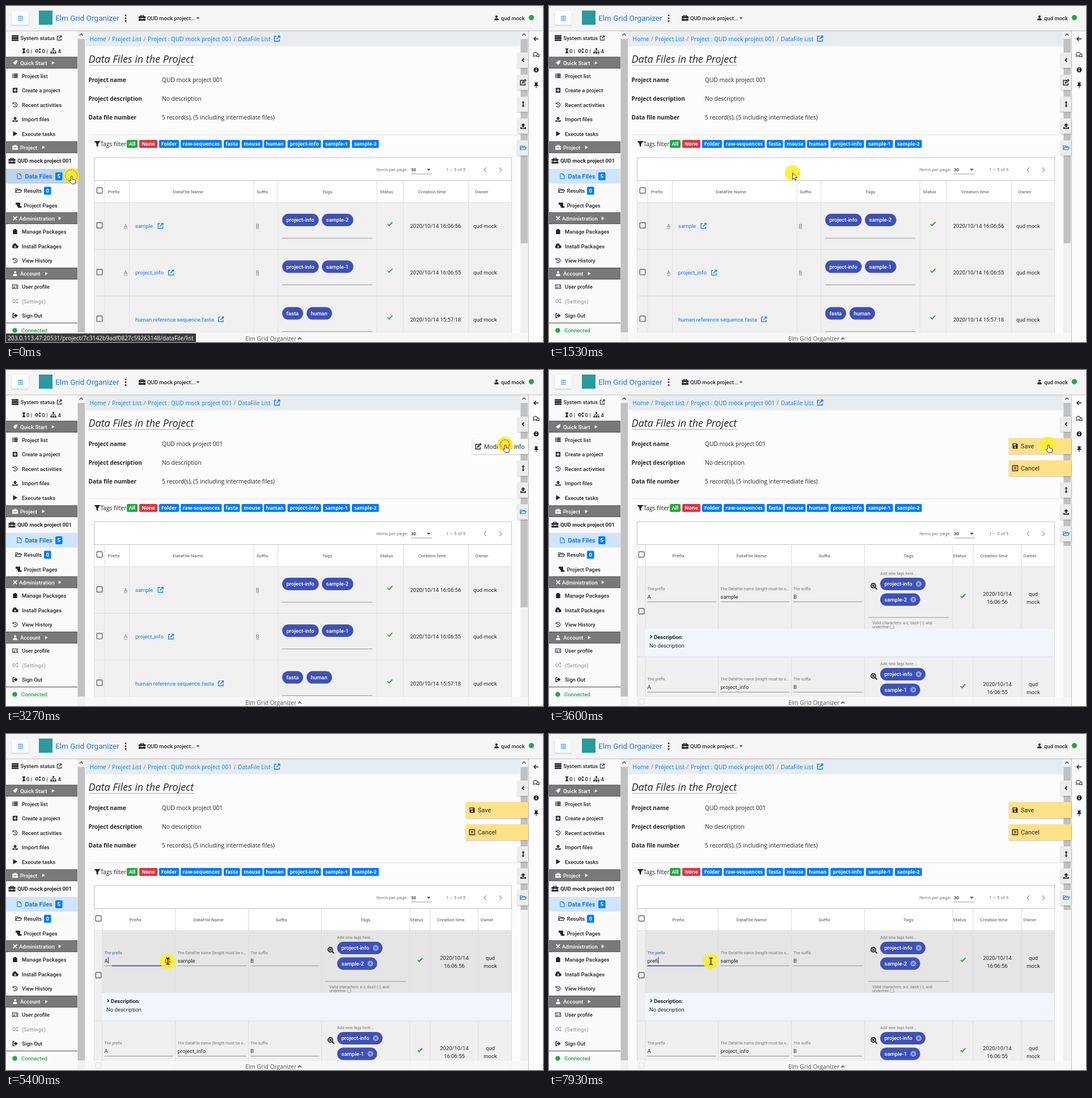
Animation, 947 px wide and 592 px high, one loop 8 s. Source, as an HTML page:

```html
<!DOCTYPE html>
<html lang="en">
<head>
<meta charset="utf-8">
<title>Data file list</title>
<style>
html,body{margin:0;width:100%;height:100%;overflow:hidden;background:#fcfcfc}
svg{display:block;width:100vw;height:100vh}
text{font:400 9.5px Roboto,sans-serif;white-space:pre}
.m{font-weight:500}
.b{font-weight:700}
.big{font-size:10.85px}
.head{font-size:8.1px;font-weight:500}
.sm{font-size:8.1px}
.tiny{font-size:7.1px}
.brand{font-size:13.6px}
.o{font:400 10.2px "Open Sans",sans-serif}
.ob{font:700 10px "Open Sans",sans-serif}
.tag{font:700 8.8px "Open Sans",sans-serif}
.title{font:italic 400 18px "Open Sans",sans-serif}
.lift{filter:drop-shadow(0 1px 1.2px rgba(0,0,0,.24))}
</style>
</head>
<body>
<svg id="stage" viewBox="0 0 947 592" preserveAspectRatio="none"></svg>
<script>
const BLUE = '#007bff', INK = '#212529', GREY = '#757575', INDIGO = '#3f51b5', GREEN = '#28a745';
const BRAND = 'Elm Grid Organizer', PROJECT = 'QUD mock project', USER = 'qud mock';
const LINK = '203.0.113.47:20531/project/7c3142b9adf0827c59263148/dataFile/list';

// name: [path, stroke width; 0 means filled]
const ICONS = {
  ext: ['M-1-4H-4.3V4.3H4V1M1-4.5H4.5V-1M4.5-4.5L-1 1', 1.3],
  server: ['M-6-5h12v2.8h-12zM-6-1.4h12v2.8h-12zM-6 2.2h12v2.8h-12z', 0],
  list: ['M-5-4h2v2h-2zM-2.2-4H5v2h-7.2zM-5-1h2v2h-2zM-2.2-1H5v2h-7.2zM-5 2h2v2h-2zM-2.2 2H5v2h-7.2z', 0],
  plus: ['M-4.5-4.5h9v9h-9zM-.8-3v2.2H-3v1.6h2.2V3h1.6V.8H3v-1.6H.8V-3z', 0],
  history: ['M-3-3A4.2 4.2 0 1 1-3.6 2.4M-4.4-4.6V-1.9H-1.7M0-2V.5L1.7 1.5', 1.2],
  upload: ['M0-5L4-1H1.3V2.5h-2.6V-1H-4zM-5 2h2.5v1.5h5V2H5v3H-5z', 0],
  play: ['M-3.8-5L4.5 0L-3.8 5z', 0],
  case: ['M-6-3h3v-2h6v2h3v3.5H1.2V0h-2.4v.5H-6zM-1.8-3h3.6v-.9h-3.6zM-6 1.5h4.8v.7h2.4V1.5H6V5H-6z', 0],
  file: ['M-3.5-4.5H1L3.5-2V4.5H-3.5zM1-4.5V-2H3.5', 1],
  folder: ['M-5 3V-3.5h3l1 1h4V-1M-5 3L-3-1H5.5L3.5 3z', 1.1],
  scroll: ['M-5-4.5H3V2H5.5V4.5H-1V2H-2.5V-1H-5z', 0],
  tools: ['M-4-4L4 4M4-4L-4 4', 2],
  box: ['M-4-3.5h2V-5h4v1.5h2V5h-8z', 0],
  cloud: ['M-5.5 1.5a2.5 2.5 0 0 1 1.7-3A3.4 3.4 0 0 1 3-2 3 3 0 0 1 3.5 4H-3.5A2.5 2.5 0 0 1-5.5 1.5M-.7-1v2h-1.6L0 3.3 2.3 1H.7v-2z', 0],
  user: ['M0-5a2.4 2.4 0 1 1-.01 0zM-4.4 5V3A3 3 0 0 1-1.4.5h2.8A3 3 0 0 1 4.4 3V5z', 0],
  card: ['M-5-3.5h10v7h-10zM-3.2 1.5h3M-1.7-1.8v1.8M1.5-1h2.2M1.5 1h2.2', 1.1],
  gears: ['M-2-2.6a2.6 2.6 0 1 1-.01 0zM4-4a1 1 0 1 1-.01 0zM4 1.5a1 1 0 1 1-.01 0z', 1.5],
  exit: ['M-1-4.5V-3H-3.5V3H-1V4.5H-5V-4.5zM.5-4L5 0L.5 4V1.4H-2.5v-2.8H.5z', 0],
  rocket: ['M5-5C0-5-2-2.5-3-1L-5 0l2 1L-1 3 0 5 1 3C2.5 2 5 0 5-5z', 0],
  filter: ['M-5.5-5H5.5L1.5 0V5.5L-1.5 3V0z', 0],
  glass: ['M-3.4-5H3.4L.8 0 3.4 5H-3.4L-.8 0z', 0],
  tree: ['M-1.5-5h3v3h-3zM-5.5 2h3v3h-3zM-1.5 2h3v3h-3zM2.5 2h3v3h-3zM-.4-2h.8V2h-.8zM-4.4-.4h8.8V2h-.8V.4h-7.2V2h-.8z', 0],
  edit: ['M1-3.5H-4.7V4.7H3.5V1M-1.7 1.7L-1-.5 3.5-5 5-3.5 .5 1z', 1.4],
  updown: ['M0-5.5L2.7-2.4H.8v4.8H2.7L0 5.5-2.7 2.4H-.8v-4.8H-2.7z', 0],
  left: ['M4.2 0H-3.5M-.5-3.5L-4 0L-.5 3.5', 1.6],
  chat: ['M-2 2.5L-5 3.2l.6-2A3.6 3.2 0 1 1-2 2.5M2.8-1.6A3 2.6 0 0 1 4.6 2.4L5 4 3 3.5A4 3 0 0 1-.5 2.8', 1.1],
  info: ['M0-4.5a4.5 4.5 0 1 1-.01 0zM-.8-.8v3.6h1.6v-3.6zM-.8-3v1.4h1.6V-3z', 0],
  pin: ['M-3-5H3v1.3H2L2.3-1 4 1.5H.6V5h-1.2V1.5H-4L-2.3-1-2-3.7H-3z', 0],
  check: ['M-4 .2L-1.4 2.8L4.3-3.2', 2],
  save: ['M-4.5-4.5H3L4.5-3V4.5H-4.5zM-3-3.3h4.5v2.5H-3zM0 .6a1.5 1.5 0 1 1-.01 0z', 0],
  cancel: ['M-4.6-4.5h9.2v9h-9.2zM-2-2L2 2M2-2L-2 2', 1.3],
  zoom: ['M-1-5a4 4 0 1 1-.01 0zM2 2L5.5 5.5M-3-1H1M-1-3V1', 1.8],
  chevL: ['M2-4L-2 0L2 4', 1.2],
  chevR: ['M-2-4L2 0L-2 4', 1.2],
  chevU: ['M-3 1.5L0-1.5L3 1.5', 1.5],
  boldL: ['M1.4-3L-1.4 0L1.4 3', 1.9],
  boldR: ['M-1.2-2.5L1.2 0L-1.2 2.5', 1.6],
  down: ['M-3.4-1.7H3.4L0 1.9z', 0]
};

const rect = (x, y, w, h, fill, extra = '') =>
  `<rect x="${x}" y="${y}" width="${w}" height="${h}" fill="${fill}" ${extra}/>`;
const line = (x1, y1, x2, y2, c = '#dcdcdc', w = 1) =>
  `<path d="M${x1} ${y1}L${x2} ${y2}" stroke="${c}" stroke-width="${w}" fill="none"/>`;
const text = (x, y, s, cls = '', fill = INK, anchor = 'start', id = '') =>
  `<text ${id && `id="${id}"`} x="${x}" y="${y}" class="${cls}" fill="${fill}" text-anchor="${anchor}">${s}</text>`;
const mid = (x, y, s, cls, fill) => text(x, y, s, cls, fill, 'middle');
const dot = (x, y, r, fill, extra = '') => `<circle cx="${x}" cy="${y}" r="${r}" fill="${fill}" ${extra}/>`;
const group = (id, body, extra = '') => `<g id="${id}" ${extra}>${body}</g>`;
function icon(name, x, y, c = INK, k = 1) {
  const [d, w] = ICONS[name];
  const paint = w ? `fill="none" stroke="${c}" stroke-width="${w}"` : `fill="${c}" fill-rule="evenodd"`;
  return `<path d="${d}" transform="translate(${x} ${y}) scale(${k})" ${paint}/>`;
}
const checkbox = (x, y) => rect(x - 4.8, y - 4.8, 9.6, 9.6, 'none', 'stroke="#666" stroke-width="1.4" rx="1"');

function header() {
  return rect(0, 0, 947, 43, '#f5f5f5', 'class="lift"') +
    rect(10, 9, 30, 24, '#fff', 'rx="2" class="lift"') +
    [18.2, 21.5, 24.8].map(y => line(21, y, 30, y, BLUE, 1.2)).join('') +
    rect(58, 8, 24, 25, '#2a9a9c') +
    text(87, 26, BRAND, 'brand', '#1f74e0') +
    [16.5, 21.5, 26.5].map(y => dot(211, y, 1.5, INK)).join('') +
    icon('case', 240, 21) + text(249, 24.5, PROJECT + '...', 'm') + icon('down', 338.5, 21.5, INK, .8) +
    icon('user', 865, 21, INK, .85) + text(873, 24.5, USER, 'm') + dot(926.5, 20.5, 4.7, GREEN);
}

function sidebar() {
  const item = (y, ic, s, c = INK) => icon(ic, 16, y, c, .92) + text(28, y + 3.5, s, 'm', c);
  const section = (y, ic, s, arrow) => rect(0, y - 10, 126, 20, '#797979') +
    line(0, y - 10, 126, y - 10, '#4a4a4a') + line(0, y + 9.7, 126, y + 9.7, '#4a4a4a') +
    icon(ic, 16, y, '#fff', .85) + text(s === 'Administration' ? 23 : 25, y + 3.5, s, 'm', '#fff') +
    icon('play', arrow, y, '#fff', .6);
  const badge = (x, y, s) => rect(x, y - 7, 12.5, 14, BLUE, 'rx="2"') + mid(x + 6.2, y + 3.4, s, 'b', '#fff');
  return rect(0, 44, 126, 548, '#fafafa') +
    icon('server', 16, 56.5) + text(25.5, 59.5, 'System status', 'm') + icon('ext', 94, 56.5, INK, .85) +
    icon('glass', 31.5, 79, INK, .85) + text(36, 82.5, '0 |', 'm') + icon('gears', 56, 79, INK, .9) + text(63.5, 82.5, '0 |', 'm') +
    icon('tree', 83.5, 79, INK, .95) + text(91.5, 82.5, '4', 'm') +
    section(100, 'rocket', 'Quick Start', 83) +
    item(123, 'list', 'Project list') + item(148.5, 'plus', 'Create a project') +
    item(174, 'history', 'Recent activities') + item(199.5, 'upload', 'Import files') + item(225, 'play', 'Execute tasks') +
    section(249, 'case', 'Project', 66) +
    icon('case', 10.5, 272.5) + text(20, 276, PROJECT + ' 001', 'b') +
    rect(0, 287, 126, 26, '#d0e5fb', 'id="active"') + icon('file', 23.5, 300, BLUE) +
    text(33.5, 304, 'Data Files', 'b big', '#1677ee') + badge(87, 300, '5') +
    icon('folder', 22, 325.5) + text(31.5, 329, 'Results', 'm') + badge(67, 325.5, '0') +
    icon('scroll', 22, 351) + text(31.5, 354.5, 'Project Pages', 'm') +
    section(374, 'tools', 'Administration', 95) +
    item(397.5, 'box', 'Manage Packages') + item(423, 'cloud', 'Install Packages') + item(448.5, 'history', 'View History') +
    section(471.5, 'user', 'Account', 71) +
    item(494.5, 'card', 'User profile') + item(520, 'gears', '(Settings)', '#a5a5a5') + item(545.5, 'exit', 'Sign Out') +
    line(0, 558.5, 126, 558.5, '#444') + dot(15.5, 571.5, 4.3, GREEN) + text(27, 575, 'Connected', 'm', GREEN) +
    rect(126, 44, 14, 548, '#f1f1f1') + rect(126.5, 58, 12.5, 517, '#c1c1c1', 'id="thumb"') +
    icon('chevU', 132.5, 50.5, '#505050');
}

function details() {
  const row = (y, k, v) => text(145.5, y, k, 'ob') + text(275, y, v, 'o');
  const tags = [['All', 213, 19, GREEN], ['None', 235, 32, '#dc3545'], ['Folder', 270, 35], ['raw-sequences', 308, 72.5],
    ['fasta', 384, 28.5], ['mouse', 415.5, 37], ['human', 455, 38], ['project-info', 496.5, 59], ['sample-1', 559, 47.5], ['sample-2', 610, 47.5]];
  return rect(140, 44, 767, 548, '#fcfcfc') + rect(140, 44, 767, 27, '#e9ecef') +
    text(147.5, 61.5, 'Home', 'o', BLUE) + text(180, 61.5, '/', 'o', '#6c757d') +
    text(187, 61.5, 'Project List', 'o', BLUE) + text(242.5, 61.5, '/', 'o', '#6c757d') +
    text(250, 61.5, `Project : ${PROJECT} 001`, 'o', BLUE) + text(401.5, 61.5, '/', 'o', '#6c757d') +
    text(409, 61.5, 'DataFile List', 'o', BLUE) + icon('ext', 478, 57.5, BLUE, 1.05) +
    text(145.5, 100, 'Data Files in the Project', 'title') + line(146, 104.5, 332, 104.5, '#aaa') +
    row(134, 'Project name', PROJECT + ' 001') + row(167, 'Project description', 'No description') +
    row(200, 'Data file number', '5 record(s), (5 including intermediate files)') +
    line(146, 227, 902, 227, '#e4e4e4') +
    icon('filter', 161, 243) + text(166.5, 247, 'Tags filter', 'o') +
    tags.map(([s, x, w, c = BLUE]) => rect(x, 236, w, 14, c, 'rx="2"') + mid(x + w / 2, 246.4, s, 'tag', '#fff')).join('') +
    rect(155.5, 267.5, 736, 40, '#fff', 'stroke="#c4c4c4"') +
    text(653, 291, 'Items per page:', 'sm', GREY) + text(714, 291, '30', 'sm m') +
    icon('down', 745.5, 288.5, '#555') + line(714, 296, 751, 296, '#999') +
    text(776, 291, '1 – 5 of 5', 'sm', GREY) + icon('chevL', 845, 288.5, '#999') + icon('chevR', 872, 288.5, '#999');
}

function chip(x, y, w, s, removable) {
  const cross = x + w - 12;
  return rect(x, y - 11, w, 22, INDIGO, 'rx="11"') + text(x + 7.5, y + 3.4, s, 'm', '#fff') +
    (removable ? dot(cross, y, 5, '#9fa8da') + `<path d="M${cross - 2} ${y - 2}l4 4m0-4l-4 4" stroke="${INDIGO}" stroke-width="1.1"/>` : '');
}
const frame = (cols, heads) => rect(156, 308, 735, 38, '#fff') +
  cols.map(x => line(x, 308, x, 346)).join('') + heads.map(([s, x]) => mid(x, 330, s, 'head', GREY)).join('') +
  line(156, 346.5, 891, 346.5) + line(155.5, 308, 155.5, 592) + line(891.5, 308, 891.5, 592);

function listTable() {
  const cols = [174, 217.5, 437, 479.5, 654, 700.5, 815.5];
  const files = [
    ['sample', 272.5, [['project-info', 487, 64.5], ['sample-2', 557, 55.5]], '16:06:56'],
    ['project_info', 291, [['project-info', 487, 64.5], ['sample-1', 557, 55.5]], '16:06:55'],
    ['human reference sequence.fasta', 379, [['fasta', 487, 37], ['human', 530, 45]], '15:57:18']];
  const rows = files.map(([name, linkX, tags, time], i) => {
    const y = 387.5 + i * 82.3;
    const part = (x, s) => mid(x, y + 3.5, s, '', GREY) + line(x - 3, y + 5, x + 3, y + 5, '#999', .8);
    return line(156, y + 41.2, 891, y + 41.2) + checkbox(165, y - 1) +
      (i < 2 ? part(211, 'A') + part(443.5, 'B') : '') +
      text(228, y + 3.5, name, '', BLUE) + icon('ext', linkX, y, BLUE) +
      tags.map(([s, x, w]) => chip(x, y - 10.5, w, s)).join('') + line(487, y + 21.5, 646, y + 21.5, '#949494') +
      icon('check', 677, y - 3.5, GREEN) + mid(757.5, y + 3.5, '2020/10/14 ' + time) + text(824, y + 3.5, USER);
  }).join('');
  return rect(156, 346, 735, 246, '#f0f0f0') + cols.map(x => line(x, 346, x, 592, '#e2e2e2')).join('') +
    frame(cols, [['Prefix', 190], ['DataFile Name', 321], ['Suffix', 452], ['Tags', 566.5], ['Status', 671], ['Creation time', 751.5], ['Owner', 839]]) +
    checkbox(165, 325) + rows;
}

function editTable() {
  const cols = [170, 298.5, 427.5, 556.5, 712, 748, 833];
  const field = (x, label, value, first) => text(x, 388, label, 'tiny', GREY, 'start', first && 'label') +
    text(x, 402.5, value, '', INK, 'start', first && 'value') + line(x, 408.5, x + 121.5, 408.5, '#949494');
  const [user, kind] = USER.split(' ');
  const row = (name, tag, time, first = '') => rect(170, 347, 721, 109, '#efefef', first && 'id="row"') +
    cols.map(x => line(x, 347, x, 456, '#dedede')).join('') + checkbox(163, 425) +
    field(173.5, 'The prefix', 'A', first) + field(302.5, 'The DataFile name (length must be s…', name, '') + field(431, 'The suffix', 'B', '') +
    text(584, 360.5, 'Add new tags here...', 'tiny', GREY) + icon('zoom', 573, 381) +
    chip(584, 377, 80, 'project-info', true) + chip(584, 404.5, 70.5, tag, true) + line(563, 436, 705, 436, '#949494') +
    text(570, 447.5, 'Valid characters: a-z, dash (-), and', 'tiny', GREY) + text(570, 455.3, 'underline (_).', 'tiny', GREY) +
    icon('check', 730, 398, GREEN) + mid(790.5, 397.8, '2020/10/14') + mid(790.5, 412, time) +
    mid(854, 397.8, user) + mid(854, 412, kind) +
    rect(170, 456, 721, 49.5, '#f0f5fe') + icon('boldR', 180, 470) +
    text(185, 473.5, '<tspan class="b">Description</tspan>:') + text(177, 488.5, 'No description') +
    line(156, 505.5, 891, 505.5);
  return rect(156, 346, 735, 246, '#efefef') +
    frame(cols, [['Prefix', 228], ['DataFile Name', 357], ['Suffix', 485.5], ['Tags', 634], ['Status', 724], ['Creation time', 784.5], ['Owner', 848]]) +
    checkbox(163, 325) + row('sample', 'sample-2', '16:06:56', true) +
    group('below', row('project_info', 'sample-1', '16:06:55'), 'transform="translate(0 159)"') +
    rect(173.5, 407.5, 121.5, 1.8, INDIGO, 'id="focus"') + rect(0, 393, .9, 11.5, INK, 'id="caret"');
}

function rightSide() {
  const tab = (y, ic, c) => rect(902, y, 19, 27, '#ececec', 'class="lift"') + icon(ic, 912, y + 13.5, c);
  const wide = (y, ic, s) => rect(811, y, 110, 28, '#ffe187', 'class="lift"') + icon(ic, 822, y + 14) + text(832, y + 18, s, 'big');
  return rect(907, 44, 14, 548, '#f1f1f1') + rect(907.5, 58, 12.5, 360, '#c1c1c1', 'id="mainThumb"') +
    icon('chevU', 913.5, 50.5, '#505050') +
    rect(140, 576, 781, 16, '#f8f8f8', 'opacity=".86"') + text(422, 590, BRAND, 'o', '#555') + icon('chevU', 518, 586, '#444') +
    rect(921, 44, 26, 548, '#fcfcfc') + line(921.5, 44, 921.5, 592, '#c4c4c4') +
    icon('left', 935, 58) + icon('chat', 935, 85.5) + icon('info', 935, 112.5) + icon('pin', 935, 139.5) +
    tab(82, 'boldL') +
    group('lowTabs', tab(159.5, 'updown') + tab(198, 'upload') + tab(236.5, 'folder', BLUE)) +
    group('modify', rect(902, 121, 19, 27, '#ececec', 'id="modifyBox" class="lift"') +
      group('modifyIcon', icon('edit', 0, 134.5)) +
      group('modifyText', text(843, 138.5, 'Modify file info', 'big'))) +
    group('actions', wide(120, 'save', 'Save') + wide(159, 'cancel', 'Cancel'));
}

const cursorArt = dot(0, 0, 13.7, '#fbf02e', 'opacity=".9"') +
  '<circle id="ring" fill="none" stroke-width="2.4" stroke-dasharray="3 1"/>' +
  '<g fill="#fff" stroke="#222" stroke-width=".9" stroke-linejoin="round">' +
  '<path id="arrow" d="M0 0V11.5L2.7 9l1.8 4 1.8-.8-1.8-3.9H8z"/>' +
  '<path id="hand" d="M-.8 2a1.3 1.3 0 0 1 2.6 0V6.2l4.6 1.1q1.4.5 1.2 2L6.8 14.5H.8L-3.2 9.5q.2-1.6 1.5-1.1l.9.8z"/></g>' +
  '<path id="beam" d="M-2.5-5.5Q0-5.5 .5-4.5Q1-5.5 3.5-5.5M.5-4.5V5M-2.5 6Q0 6 .5 5Q1 6 3.5 6" fill="none" stroke="#111" stroke-width="1.4"/>';

stage.innerHTML = details() + group('listView', listTable()) + group('editView', editTable()) +
  rightSide() + sidebar() + header() +
  group('status', rect(0, 577, 335, 15, '#3b3b3b') + text(3, 589, LINK, 'o', '#fff')) +
  group('pointer', cursorArt);

const $ = id => document.getElementById(id);
const set = (id, attrs) => { for (const k in attrs) $(id).setAttribute(k, attrs[k]); };
const show = (id, on) => { $(id).style.display = on ? '' : 'none'; };
const clamp = v => Math.max(0, Math.min(1, v));
const easeOut = v => 1 - (1 - clamp(v)) ** 3;

// time, x, y of the pointer
const PATH = [[1000, 115, 299], [1130, 160, 299], [1530, 429, 294], [1800, 560, 270], [2330, 875, 154], [2500, 908, 138],
  [2670, 916, 131], [2900, 914, 131], [3130, 880, 131], [3800, 880, 131], [3930, 790, 185], [4200, 461, 361],
  [4400, 345, 394], [4530, 300, 400], [4670, 296, 400], [4870, 289, 400], [5070, 285, 400]];
const CLICKS = [3000, 5270], EDIT_AT = 3400;
const KEYS = [[6400, ''], [7200, 'p'], [7330, 'pr'], [7530, 'pre'], [7730, 'pref'], [7930, 'prefi']];

function pointerAt(t) {
  const i = PATH.findIndex(p => p[0] > t);
  if (i < 0) return PATH[PATH.length - 1].slice(1);
  if (!i) return PATH[0].slice(1);
  const [a, b] = [PATH[i - 1], PATH[i]], k = (t - a[0]) / (b[0] - a[0]);
  return [a[1] + (b[1] - a[1]) * k, a[2] + (b[2] - a[2]) * k];
}

function drawPointer(t, x, y, edit) {
  set('pointer', { transform: `translate(${x} ${y})` });
  const beam = edit && y > 380;
  const hand = x < 126 || x > 902 || (t > 2670 && t < 3870);
  show('beam', beam);
  show('hand', hand && !beam);
  show('arrow', !hand && !beam);
  const start = CLICKS.find(c => t >= c && t < c + 450);
  const age = t < 1000 ? 350 : start === undefined ? -1 : t - start;
  show('ring', age >= 0);
  const k = clamp(age / 450);
  set('ring', { r: Math.max(0, age * .03), stroke: `rgb(${225 + 15 * k},${35 + 180 * k},30)` });
}

function drawField(t) {
  const typed = KEYS.filter(k => k[0] <= t).pop();
  $('value').textContent = typed ? typed[1] : 'A';
  const focused = t >= 5330;
  set('label', { fill: focused ? INDIGO : GREY });
  const w = 121.5 * (.5 + .5 * easeOut((t - 5330) / 300));
  show('focus', focused);
  set('focus', { x: 234.25 - w / 2, width: w });
  show('caret', focused && !(t >= 5800 && t < 6270) && !(t >= 6870 && t < 7200));
  set('caret', { x: 173.7 + $('value').getComputedTextLength() });
}

function draw(t) {
  const [x, y] = pointerAt(t), edit = t >= EDIT_AT;
  show('listView', !edit);
  show('editView', edit);
  show('modify', !edit);
  show('actions', edit);
  show('status', x < 126);
  set('active', { fill: x < 126 ? '#c1d2eb' : '#d0e5fb' });
  set('thumb', { fill: x >= 126 && x < 140 ? '#a8a8a8' : '#c1c1c1' });
  set('mainThumb', { height: edit ? 252 : 360 });
  set('lowTabs', { transform: `translate(0 ${edit ? 38.5 : 0})` });
  const open = easeOut((t - 2800) / 250), left = 902 - 79 * open;
  set('modifyBox', { x: left, width: 921 - left, fill: open > 0 ? '#fff' : '#ececec' });
  set('modifyIcon', { transform: `translate(${left + 10} 0)` });
  show('modifyText', open > 0);
  set('modifyText', { transform: `translate(${left - 823} 0)`, opacity: open });
  set('row', { fill: y > 347 && y < 456 ? '#e5e5e5' : '#efefef' });
  if (edit) drawField(t);
  drawPointer(t, x, y, edit);
}

const begin = performance.now();
function tick(now) {
  draw(Math.max(0, now - begin) % 8000);
  requestAnimationFrame(tick);
}
draw(0);
requestAnimationFrame(tick);
</script>
</body>
</html>
```
